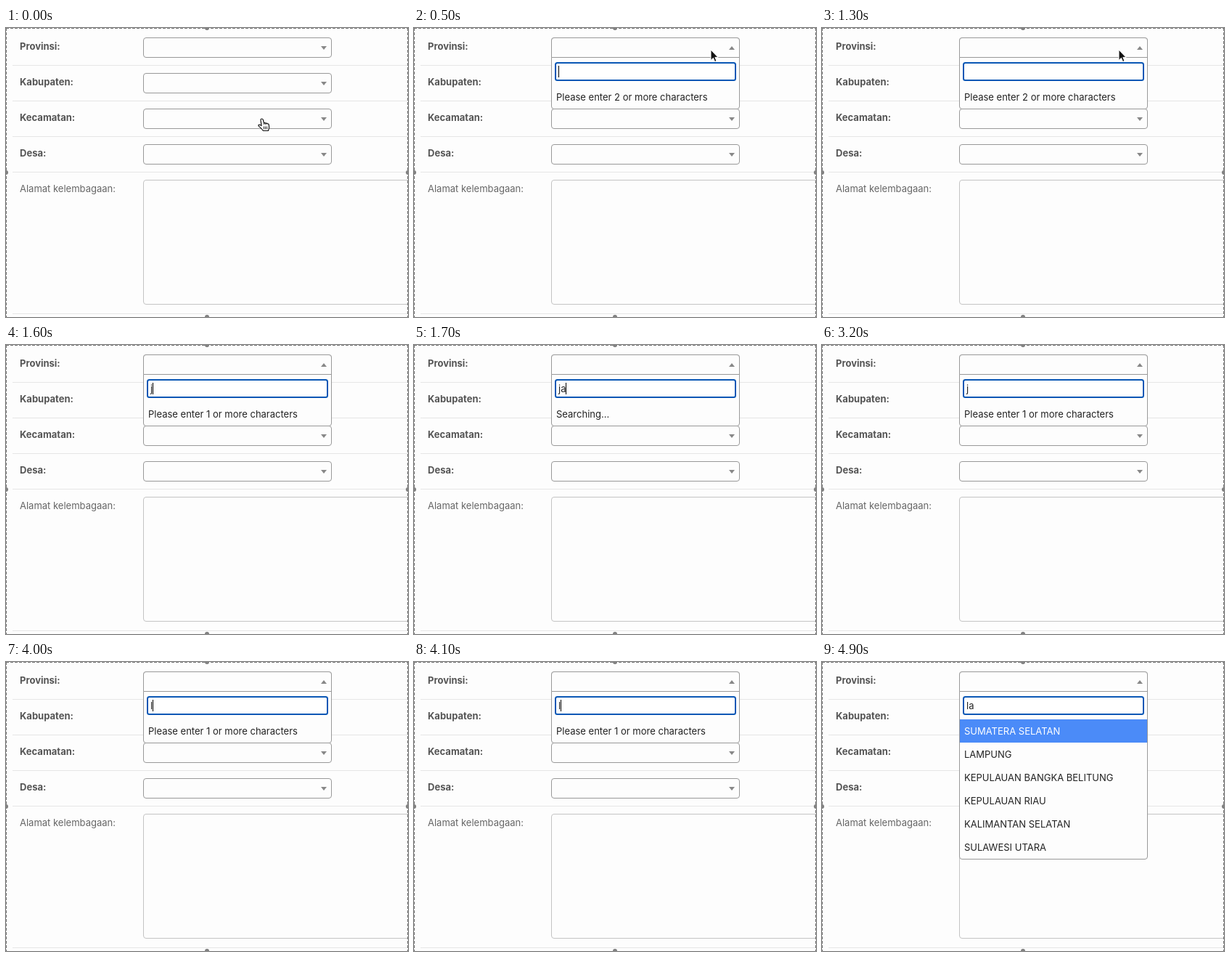
Recreate the animation shown at these times as an HTML page. Size 554x398 px, loop 5 s.

```html
<!DOCTYPE html>
<html lang="id">
<meta charset="utf-8">
<title>Pilihan provinsi</title>
<style>
  html, body { margin: 0; height: 100%; overflow: hidden; background: #fdfdfd; }
  svg { display: block; }
  text { font: 13px Inter, sans-serif; fill: #222; white-space: pre; }
  .label { fill: #666; }
  .bold { font-weight: 700; fill: #555; }
  .box { fill: #fdfdfd; stroke: #999; }
  .rule { stroke: #e6e6e6; }
  .edge { stroke: #777; stroke-dasharray: 4 2; }
</style>
<svg id="stage" width="554" height="398" viewBox="0 0 554 398">
  <g id="form"></g>
  <g id="menu"></g>
  <g id="pointer"></g>
</svg>
<script>
const LOOP = 5000;
const $ = id => document.getElementById(id);
const text = (x, y, s, cls = '') => `<text x="${x}" y="${y}" class="${cls}">${s}</text>`;
const line = (d, cls) => `<path d="${d}" class="${cls}" fill="none"/>`;
const arrow = (y, up) =>
  `<path d="M434 ${up ? y + 5 : y}h8l-4 ${up ? -5 : 5}z" fill="#888"/>`;

const enter = n => [`Please enter ${n} or more characters`];
const searching = ['Searching…'];
const javaList = ['JAMBI', 'DKI JAKARTA', 'JAWA BARAT', 'JAWA TENGAH', 'JAWA TIMUR'];
const laList = ['SUMATERA SELATAN', 'LAMPUNG', 'KEPULAUAN BANGKA BELITUNG',
  'KEPULAUAN RIAU', 'KALIMANTAN SELATAN', 'SULAWESI UTARA'];

// start time, typed text, menu rows, caret opacity
const states = [
  [0],
  [500, '', enter(2), 1],
  [900, '', enter(2), .5],
  [1000, '', enter(2), 0],
  [1500, 'j', enter(1), 1],
  [1700, 'ja', searching, 1],
  [1800, 'ja', javaList, 1],
  [2200, 'ja', javaList, 0],
  [2700, 'ja', javaList, 1],
  [3200, 'j', enter(1), 0],
  [3300, '', enter(2), 1],
  [3700, '', enter(2), 0],
  [4000, 'l', enter(1), 1],
  [4200, 'la', searching, 1],
  [4300, 'la', laList, 1],
  [4600, 'la', laList, .5],
  [4700, 'la', laList, 0],
];
const caretX = { '': 199.5, j: 202.5, l: 202.5, ja: 209.5, la: 209.5 };

// start time, tip x, tip y, shape
const moves = [
  [0, 352, 125, 'hand'],
  [100, 376, 96, 'hand'],
  [200, 402, 46, 'hand'],
  [300, 409, 31, 'hand'],
  [500, 409, 30, 'arrow'],
  [1500],
];
const shapes = {
  hand: `<path d="M-1 1.5Q-1 0 .5 0T2.3 1.5L3.6 6Q5 5 6 6.4Q7.5 5.6 8.4 7Q10 6.6 10.3 8.5
    L10.6 12Q10.3 14 9.4 16.5H2.4Q.5 13.5-3.2 10.6Q-4.8 8.8-3.6 8.2Q-2.4 7.6 0 9.6z"
    fill="#fff" stroke="#111" stroke-width="1.2" stroke-linejoin="round"/>
    <path d="M3.4 10.5v4M5.5 10.5v4M7.6 10.5v4M3.6 6v2M6 6.4v2" stroke="#111" stroke-width=".9"/>`,
  arrow: `<path d="M0 0V14.5L3.4 11.3L5.6 16.4L8 15.4L5.8 10.4H10z"
    fill="#111" stroke="#fff" stroke-width="1" stroke-linejoin="round"/>`,
};

function drawForm() {
  const labels = ['Provinsi:', 'Kabupaten:', 'Kecamatan:', 'Desa:'];
  let out = labels.map((s, i) => {
    const y = 49 * i;
    return text(19, 30 + y, s, 'bold') + line(`M9 ${51.5 + y}H554`, 'rule') +
      `<rect x="189.5" y="${13.5 + y}" width="259" height="27" rx="3.5" class="box"/>` +
      arrow(25 + y);
  }).join('');
  out += text(19, 226, 'Alamat kelembagaan:', 'label') + line('M9 393.5H554', 'rule') +
    '<rect x="189.5" y="209.5" width="380" height="171" rx="3.5" class="box" style="stroke:#c4c4c4"/>' +
    line('M0 .5H554M.5 0V398M553.5 0V398', 'edge');
  for (const [x, y] of [[277, 0], [277, 398], [0, 199], [554, 199]])
    out += `<circle cx="${x}" cy="${y}" r="3" fill="#808080"/>`;
  $('form').innerHTML = out;
}

function drawMenu([, typed, rows, caret]) {
  if (!rows) return '';
  const bottom = 79.5 + Math.min(200, 32 * rows.length);
  const isList = rows.length > 1;
  return `<path d="M189.5 40.5V17q0-3.5 3.5-3.5H445q3.5 0 3.5 3.5V${bottom - 3.5}
      q0 3.5-3.5 3.5H193q-3.5 0-3.5-3.5V40.5H448.5" class="box"/>` + arrow(25, true) +
    '<rect x="195" y="48" width="248" height="24" rx="2.5" fill="#fff" stroke="#0a57b5" stroke-width="2"/>' +
    text(199, 65, typed) +
    `<path d="M${caretX[typed]} 52V68" stroke="#000" opacity="${caret}"/>` +
    (isList ? '<rect x="190" y="79" width="258" height="32" fill="#4b8bf8"/>' : '') +
    rows.map((s, i) => `<g${isList && !i ? ' style="filter:brightness(0) invert(1)"' : ''}>` +
      text(196, 100 + 32 * i, s) + '</g>').join('');
}

function drawPointer([, x, y, shape]) {
  return shape ? `<g transform="translate(${x} ${y})">${shapes[shape]}</g>` : '';
}

const shown = {};
function show(id, list, draw, t) {
  const item = list.findLast(([start]) => start <= t);
  if (shown[id] === item) return;
  shown[id] = item;
  $(id).innerHTML = draw(item);
}

function tick() {
  const t = performance.now() % LOOP;
  show('menu', states, drawMenu, t);
  show('pointer', moves, drawPointer, t);
  requestAnimationFrame(tick);
}

drawForm();
tick();
</script>
</html>
```
